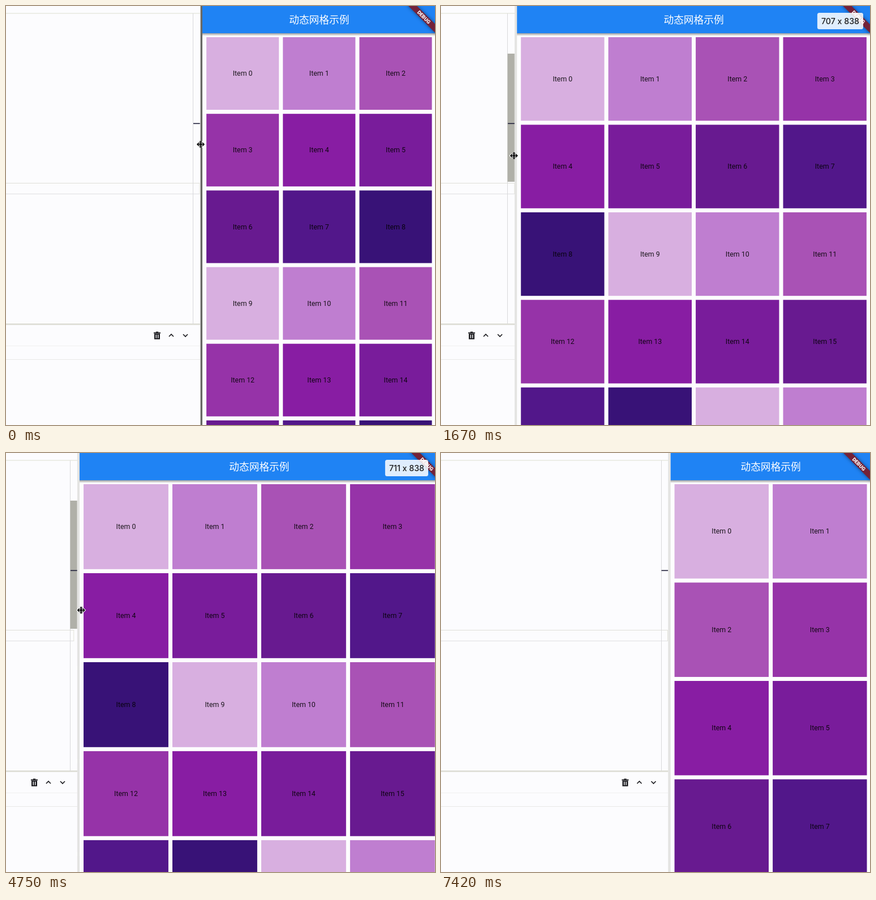
An HTML page with a canvas for the animation above (7.51 s loop, 758 by 739 pixels).

```html
<!DOCTYPE html>
<html lang="zh">
<head>
<meta charset="utf-8">
<style>
  html, body { margin: 0; width: 100%; height: 100%; overflow: hidden; background: #fcfcfe; }
  canvas { display: block; }
</style>
</head>
<body>
<canvas id="stage" width="758" height="739"></canvas>
<script>
const ctx = document.getElementById('stage').getContext('2d');
const LOOP = 7510, STEP = 1000 / 12;
const SCALE = 0.8853, RIGHT = 759.6, GAP = 8 * SCALE;
const SHADES = ['#d8afe0', '#bf7ed0', '#a952b5', '#9633a8', '#881da3', '#791c9b', '#681a90', '#52178a', '#381277'];

// [time, left edge of the app]
const EDGE = [[0, 347], [180, 347], [333, 327], [915, 213], [1000, 197.5], [1085, 182], [1833, 130.5],
  [2750, 130.5], [2800, 111.5], [2833, 111.5], [3880, 23], [4083, 23], [4167, 20], [4250, 20],
  [5083, 245], [5250, 301], [5333, 325], [5900, 405.5], [7510, 405.5]];
// [time, pointer distance from the edge] and [time, pointer height]
const GRIP = [[0, -3], [1000, -7.5], [1833, -5], [2750, -5], [2833, -24], [3917, -3], [5250, 4], [5917, -2.5], [7510, -2.5]];
const HAND = [[0, 244], [1000, 253], [2833, 283], [3917, 288], [4250, 288], [5250, 261], [5917, 249], [7510, 249]];
// [time, opacity of the scrollbar thumb]
const THUMB = [[0, 0], [170, 0], [333, 1], [2085, 1], [2670, 0.5], [2833, 0.5], [2917, 1], [6333, 1], [7417, 0], [7510, 0]];

// Monotone cubic through the points
function track(pts, t) {
  t = Math.max(0, t);
  let i = 0;
  while (i < pts.length - 2 && t >= pts[i + 1][0]) i++;
  const rate = k => pts[k] && pts[k + 1] ? (pts[k + 1][1] - pts[k][1]) / (pts[k + 1][0] - pts[k][0]) : 0;
  const slope = k => {
    const a = rate(k - 1), b = rate(k);
    return a * b > 0 ? 2 * a * b / (a + b) : 0;
  };
  const [t0, v0] = pts[i], [t1, v1] = pts[i + 1];
  const d = t1 - t0, u = (t - t0) / d, w = 1 - u;
  return v0 * w * w * (1 + 2 * u) + v1 * u * u * (3 - 2 * u)
    + d * u * w * (slope(i) * w - slope(i + 1) * u);
}

function rect(x, y, w, h, color) {
  ctx.fillStyle = color;
  ctx.fillRect(x, y, w, h);
}

function text(str, x, y, font, color) {
  ctx.font = font;
  ctx.fillStyle = color;
  ctx.fillText(str, x, y);
}

function stroke(d, width, color) {
  ctx.lineWidth = width;
  ctx.strokeStyle = color;
  ctx.stroke(new Path2D(d));
}

function drawPane(x, late, thumb, hover) {
  const end = x - 4;
  rect(0, 0, end, 739, '#fcfcfe');
  rect(0, 12.5, end, 1, '#dedfd2');
  rect(0, 312, Math.min(end, late - 4.5), 1, '#dfdfd8');
  rect(0, 331, Math.min(end, late - 4.5), 1, '#dfdfe2');
  if (late - 5.5 < end) rect(late - 5.5, 312, 1, 20, '#e4e4da');
  rect(0, 560, end, 2.5, '#dcdcd4');
  rect(0, 599, end, 1, '#f0f0f0');
  rect(0, 623, end, 1, '#e8e8e8');
  rect(Math.round(x - 17), 13, 1, 547, '#d8d8da');
  ctx.globalAlpha = thumb;
  rect(x - 16.5, 84, 12.2, 226, '#b0b0a8');
  ctx.globalAlpha = 1;
  rect(x - 16, 206.5, 11.7, 1.6, '#20203a');

  ctx.save();
  ctx.translate(x - 80, 581);
  const ink = '#1c1c20';
  rect(-2.2, -6.6, 4.4, 2, ink);
  rect(-6, -5.4, 12, 2, ink);
  rect(-5, -3, 10, 9.8, ink);
  rect(-2.4, -1.4, 1.4, 6.2, '#fcfcfe');
  rect(1, -1.4, 1.4, 6.2, '#fcfcfe');
  ctx.translate(25, 0);
  stroke('M-4 2L0 -2L4 2', 1.7, ink);
  ctx.translate(25, 0);
  stroke('M-4 -2L0 2L4 -2', 1.7, ink);
  ctx.restore();

  rect(end, 0, 4, 739, '#e4e4e2');
  if (hover) rect(x - 3.3, 0, 3.3, 739, '#686864');
}

function drawApp(x, width) {
  rect(x, 0, 758 - x, 739, '#fdfdfe');
  const size = width / SCALE;
  const cols = size >= 600 ? 4 : Math.round(size) > 400 ? 3 : 2;
  const cell = (width - GAP * (cols + 1)) / cols;
  ctx.textAlign = 'center';
  for (let i = 0; ; i++) {
    const left = x + GAP + (i % cols) * (cell + GAP);
    const top = 55 + Math.floor(i / cols) * (cell + GAP);
    if (top > 739) break;
    rect(left, top, cell, cell, SHADES[i % 9]);
    text('Item ' + i, left + cell / 2, top + cell / 2 + 4.2, '12.4px Roboto, sans-serif', 'rgba(0,0,0,.87)');
  }

  const shade = ctx.createLinearGradient(0, 48, 0, 53);
  shade.addColorStop(0, 'rgba(0,0,0,.38)');
  shade.addColorStop(1, 'rgba(0,0,0,0)');
  rect(x, 48, width, 5, shade);
  rect(x, 0, width, 48, '#1f83f4');
  text('动态网格示例', x + width / 2, 30.6, '500 17.7px "Noto Sans CJK SC", "Noto Sans CJK", sans-serif', '#fff');

  ctx.save();
  ctx.translate(x + width, -1.6);
  ctx.rotate(Math.PI / 4);
  ctx.scale(SCALE, SCALE);
  ctx.shadowBlur = 6;
  ctx.shadowColor = 'rgba(0,0,0,.5)';
  rect(-40, 28, 80, 12, '#742238');
  ctx.shadowColor = 'transparent';
  text('DEBUG', 0, 37.5, '900 10.2px Roboto, sans-serif', '#fff');
  ctx.restore();
}

function drawBadge(size) {
  const label = size + ' x 838';
  ctx.font = '500 14.2px Inter, sans-serif';
  const w = ctx.measureText(label).width + 14;
  ctx.fillStyle = 'rgba(255,255,255,.86)';
  ctx.beginPath();
  ctx.roundRect(746 - w, 12, w, 29, 3.5);
  ctx.fill();
  ctx.textAlign = 'right';
  text(label, 739, 32, ctx.font, '#1c1c1c');
}

function drawPointer(x, y) {
  const shape = 'M-6 0H6M-3 -3L-6 0L-3 3M3 -3L6 0L3 3M-1 -6V6M1 -6V6';
  ctx.save();
  ctx.translate(x, y);
  stroke(shape, 3.4, '#fff');
  stroke(shape, 1.5, '#000');
  ctx.restore();
}

function draw(now) {
  const step = Math.min(89, Math.floor((now % LOOP + 4) / STEP));
  const t = step * STEP;
  const x = track(EDGE, t);
  const late = track(EDGE, t - 15); // the page lays out slightly after the drag
  drawApp(x, RIGHT - late);
  drawPane(x, late, track(THUMB, t), step === 0);
  if (step > 0 && t < 6900) drawBadge(Math.round((RIGHT - x) / SCALE));
  if (t < 6400) drawPointer(x + track(GRIP, t), track(HAND, t));
}

const start = performance.now();
function tick() {
  draw(performance.now() - start);
  requestAnimationFrame(tick);
}
tick();
</script>
</body>
</html>
```
